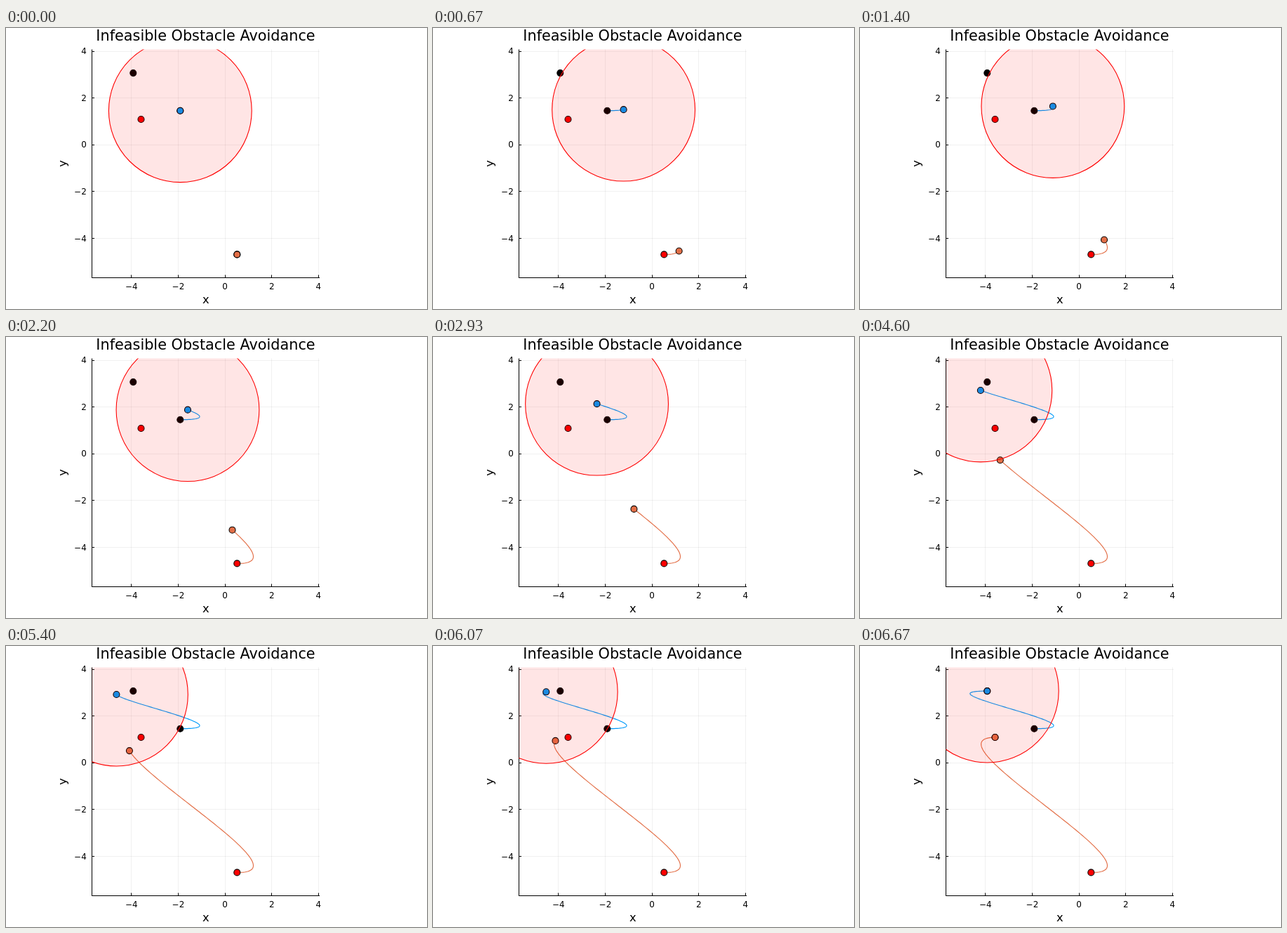
An HTML page with a canvas that plays this animation: 600 by 400 pixels, repeating every 6.74 s.

```html
<!DOCTYPE html>
<html lang="en">
<head>
<meta charset="utf-8">
<title>Infeasible Obstacle Avoidance</title>
<style>
  html, body { margin: 0; width: 100%; height: 100%; overflow: hidden; background: #fff; }
  canvas { display: block; width: 600px; height: 400px; }
</style>
</head>
<body>
<canvas id="stage"></canvas>
<script>
const LOOP = 6740, STEPS = 100, UNIT = 33.3;
const PLOT = { left: 122.5, top: 30.5, right: 447, bottom: 355.5 };
const TICKS = [-4, -2, 0, 2, 4];
const RADIUS = 101.9;
const BLUE = '#009afa', ORANGE = '#e36f47', RED = '#ff0000', BLACK = '#000000';

const canvas = document.getElementById('stage');
const ctx = canvas.getContext('2d');
const ratio = window.devicePixelRatio || 1;
canvas.width = 600 * ratio;
canvas.height = 400 * ratio;
ctx.scale(ratio, ratio);

const px = x => 312.1 + x * UNIT;
const py = y => 166.2 - y * UNIT;

// Cubic from a to b with start and end velocities
function hermite(a, b, v0, v1, s) {
  const r = 1 - s;
  return a + (b - a) * s * s * (3 - 2 * s) + v0 * s * r * r - v1 * s * s * r;
}

function bluePos(s) {
  const bend = (s * (1 - s)) ** 3;
  return [hermite(248.3, 181.3, 346.8, 323.7, s), hermite(117.7, 64.1, 0, 0, s) - 36 * bend];
}

function orangePos(s) {
  return [hermite(329.3, 192.5, 346.1, 318, s), hermite(322.4, 130, 5.9, -5.9, s)];
}

function line(x1, y1, x2, y2, color, width = 1) {
  ctx.beginPath();
  ctx.moveTo(x1, y1);
  ctx.lineTo(x2, y2);
  ctx.strokeStyle = color;
  ctx.lineWidth = width;
  ctx.stroke();
}

function disc([x, y], r, fill, stroke) {
  ctx.beginPath();
  ctx.arc(x, y, r, 0, Math.PI * 2);
  ctx.fillStyle = fill;
  ctx.fill();
  ctx.strokeStyle = stroke;
  ctx.lineWidth = 1.1;
  ctx.stroke();
}

const dot = (pos, color) => disc(pos, 4.5, color, BLACK);

function text(str, x, y, size, align = 'center') {
  ctx.font = size + 'px "DejaVu Sans", sans-serif';
  ctx.textAlign = align;
  ctx.fillStyle = BLACK;
  ctx.fillText(str, x, y);
}

function trail(pos, step, color) {
  ctx.beginPath();
  for (let i = 0; i <= step; i++) ctx.lineTo(...pos(i / STEPS));
  ctx.strokeStyle = color;
  ctx.lineWidth = 1.15;
  ctx.lineJoin = 'round';
  ctx.stroke();
}

function drawGrid() {
  const grid = 'rgba(0,0,0,0.055)';
  for (const v of TICKS) {
    const x = Math.floor(px(v)) + 0.5, y = Math.floor(py(v)) + 0.5;
    line(x, PLOT.top, x, PLOT.bottom, grid);
    line(PLOT.left, y, PLOT.right, y, grid);
  }
}

function drawAxes() {
  line(PLOT.left, PLOT.top, PLOT.left, PLOT.bottom + 0.5, BLACK);
  line(PLOT.left - 0.5, PLOT.bottom, PLOT.right, PLOT.bottom, BLACK);
  for (const v of TICKS) {
    const x = Math.floor(px(v)) + 0.5, y = Math.floor(py(v)) + 0.5;
    const label = String(v).replace('-', '\u2212');
    line(x, PLOT.bottom, x, PLOT.bottom - 4, BLACK);
    line(PLOT.left, y, PLOT.left + 3.5, y, BLACK);
    text(label, px(v), 371.6, 11.9);
    text(label, 114.8, py(v) + 4.2, 11.9, 'right');
  }
  text('Infeasible Obstacle Avoidance', 284.5, 18, 20.8);
  text('x', 284.7, 391.5, 16.3);
  ctx.save();
  ctx.translate(86, 193);
  ctx.rotate(-Math.PI / 2);
  text('y', 0, 0, 16.3);
  ctx.restore();
}

function drawScene(step) {
  const s = step / STEPS;
  ctx.fillStyle = '#fff';
  ctx.fillRect(0, 0, 600, 400);
  drawGrid();
  drawAxes();

  ctx.save();
  ctx.beginPath();
  ctx.rect(PLOT.left, PLOT.top, PLOT.right - PLOT.left, PLOT.bottom - PLOT.top);
  ctx.clip();
  trail(bluePos, step, BLUE);
  trail(orangePos, step, ORANGE);
  for (const end of [0, 1]) {
    dot(bluePos(end), BLACK);
    dot(orangePos(end), RED);
  }
  dot(bluePos(s), BLUE);
  dot(orangePos(s), ORANGE);
  disc(bluePos(s), RADIUS, 'rgba(255,0,0,0.1)', RED);
  ctx.restore();
}

// 15 steps per second, snapped to hundredths of a second
function stepAt(ms) {
  return Math.min(STEPS, Math.floor(Math.floor(ms / 10) * 0.15 + 0.06));
}

const start = performance.now();
function tick() {
  drawScene(stepAt((performance.now() - start) % LOOP));
  requestAnimationFrame(tick);
}
tick();
</script>
</body>
</html>
```
